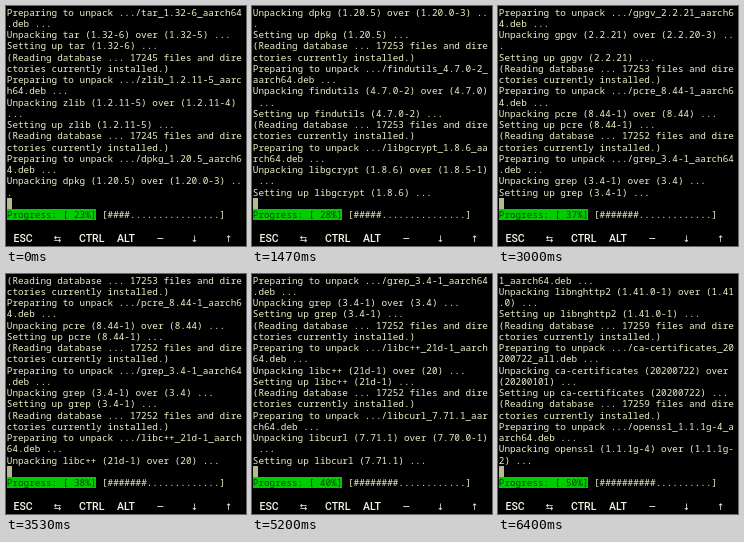
These frames come from a looping animation (240x240 px, 7140 ms). An HTML page:

```html
<!DOCTYPE html>
<html lang="en">
<head>
<meta charset="utf-8">
<title>Package upgrade</title>
<style>
html, body { margin: 0; width: 100%; height: 100%; overflow: hidden; background: #000; }
body { position: relative; color: #f0f0c8; }
#term {
  position: absolute; left: .8px; top: .5px; white-space: pre;
  font: 9.33px/11.25px "Noto Sans Mono", "DejaVu Sans Mono", monospace;
  font-variant-ligatures: none;
}
#log { height: 191.25px; }
#cursor { width: 1ch; height: 11.25px; background: #b9b991; }
#pct { display: inline-block; background: #00cd00; color: #044404; }
#keys {
  position: absolute; left: 0; top: 226px; width: 240px; display: flex;
  font: 500 10.5px/14px Roboto, "DejaVu Sans", sans-serif; color: #f4f4e4;
}
#keys span { flex: 1 0 0; text-align: center; }
#keys .sym { font-size: 9px; }
</style>
</head>
<body>
<div id="term"><div id="log"></div><div id="cursor"></div><div id="bar"><span id="pct"></span><span id="hash"></span></div></div>
<div id="keys"><span>ESC</span><span class="sym">⇆</span><span>CTRL</span><span>ALT</span><span class="sym">―</span><span class="sym">↓</span><span class="sym">↑</span></div>
<script>
const COLS = 42, ROWS = 17, BAR = 20, LOOP = 7140;

// name, new version, old version, files in database, architecture
const packages = [
  ['tar', '1.32-6', '1.32-5', 17245],
  ['zlib', '1.2.11-5', '1.2.11-4', 17245],
  ['dpkg', '1.20.5', '1.20.0-3', 17245],
  ['findutils', '4.7.0-2', '4.7.0', 17253],
  ['libgcrypt', '1.8.6', '1.8.5-1', 17253],
  ['gpgv', '2.2.21', '2.2.20-3', 17253],
  ['pcre', '8.44-1', '8.44', 17253],
  ['grep', '3.4-1', '3.4', 17252],
  ['libc++', '21d-1', '20', 17252],
  ['libcurl', '7.71.1', '7.70.0-1', 17252],
  ['curl', '7.71.1', '7.70.0-1', 17259],
  ['libnghttp2', '1.41.0-1', '1.41.0', 17259],
  ['ca-certificates', '20200722', '20200101', 17259, 'all'],
  ['openssl', '1.1.1g-4', '1.1.1g-2', 17259]
];

const messages = packages.flatMap(([name, now, old, files, arch = 'aarch64']) => [
  `(Reading database ... ${files} files and directories currently installed.)`,
  `Preparing to unpack .../${name}_${now}_${arch}.deb ...`,
  `Unpacking ${name} (${now}) over (${old}) ...`,
  `Setting up ${name} (${now}) ...`
]);

// bursts of evenly spaced messages
const bursts = [
  { from: 70, to: 870, count: 5, pct: 27 },
  { from: 1000, to: 2200, count: 11, pct: 32 },
  { from: 2470, to: 3000, count: 5, pct: 37 },
  { from: 3070, to: 4330, count: 7, pct: 40 },
  { from: 5130, to: 5730, count: 8, pct: 45 },
  { from: 5800, to: 6400, count: 8, pct: 50 }
];

const wrap = text => text.match(new RegExp(`.{1,${COLS}}`, 'g'));
const put = (id, text) => { document.getElementById(id).textContent = text; };

function stateAt(t) {
  let printed = 11, done = 23;
  for (const { from, to, count, pct } of bursts) {
    if (t < from) break;
    const k = Math.min(count, 1 + Math.floor((t - from) / (to - from) * (count - 1)));
    printed += k;
    done += Math.floor((pct - done) * k / count);
  }
  return { printed, done };
}

let shown;

function draw(now) {
  const { printed, done } = stateAt(now % LOOP);
  if (printed !== shown) {
    shown = printed;
    const marks = '#'.repeat(Math.floor(done / 100 * BAR));
    put('log', messages.slice(0, printed).flatMap(wrap).slice(-ROWS).join('\n'));
    put('pct', `Progress: [ ${done}%]`);
    put('hash', ` [${marks.padEnd(BAR, '.')}]`);
  }
  requestAnimationFrame(draw);
}
draw(0);
</script>
</body>
</html>
```
